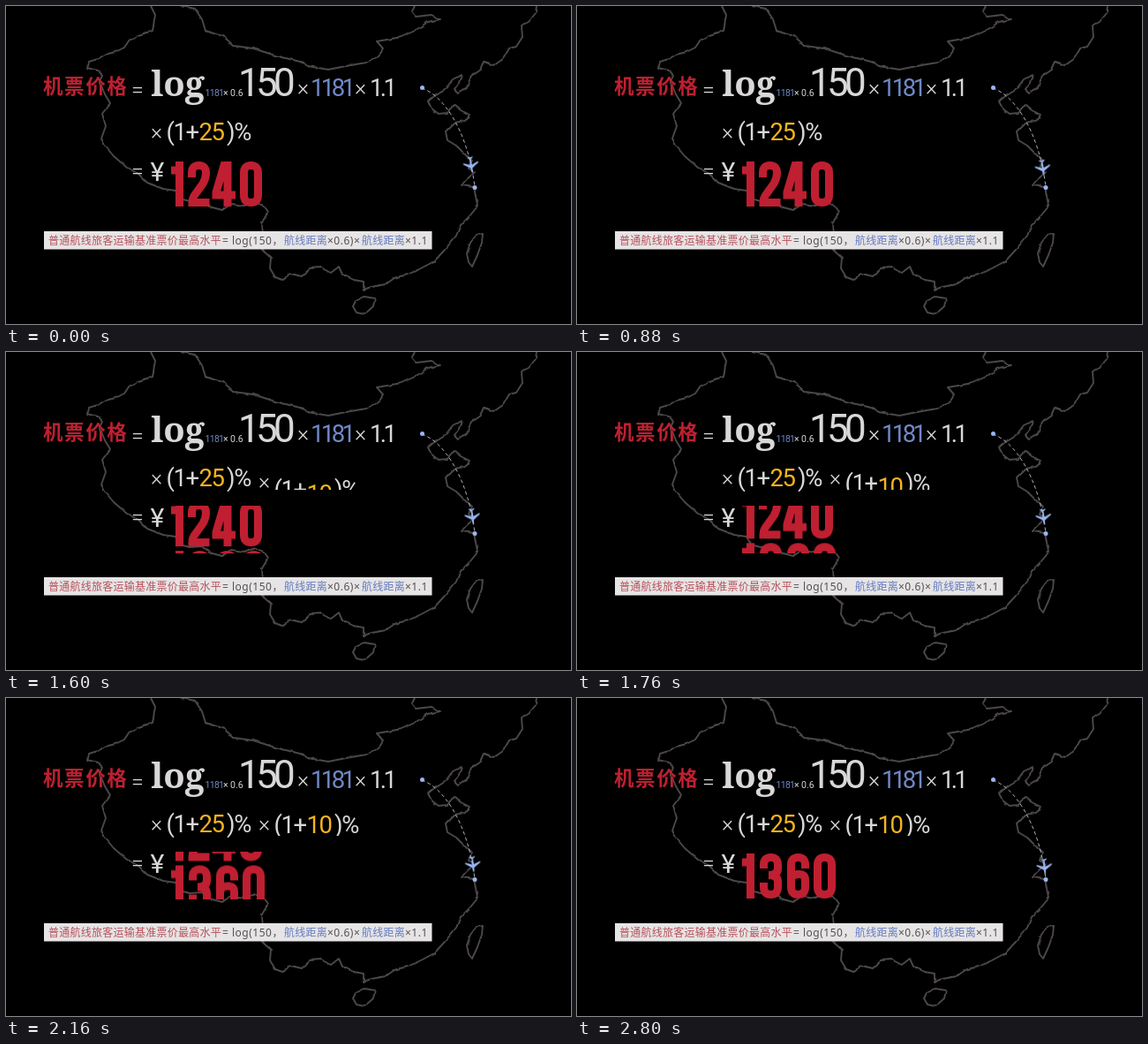
These frames come from a looping animation (640 px wide and 360 px high, 2.88 s). An HTML page:

```html
<!DOCTYPE html>
<html lang="zh-CN">
<head>
<meta charset="utf-8">
<title>机票价格</title>
<style>
  html, body { margin: 0; width: 100%; height: 100%; overflow: hidden; background: #000; }
  svg { display: block; width: 100vw; height: 100vh; }
  text { fill: #d9d7d7; font-family: Roboto, "Liberation Sans", sans-serif; white-space: pre; }
  .red { fill: #bd2031; }
  .blue { fill: #7088c6; }
  .gold { fill: #f4b41e; }
  .title { font: 700 22.5px "Noto Sans CJK SC", "Noto Sans CJK", sans-serif; letter-spacing: 1.6px; }
  .log { font: 600 40px "Noto Serif", serif; }
  .sub { font-size: 10.5px; letter-spacing: -.7px; }
  .base { font-size: 44px; letter-spacing: -4.7px; }
  .num { font-size: 27.5px; letter-spacing: -3.6px; }
  .term { font-size: 27.5px; letter-spacing: -1.4px; }
  .yen { font-size: 30px; }
  .sign { font-size: 25px; font-weight: 300; }
  .note { font: 12px "Noto Sans", "Noto Sans CJK SC", "Noto Sans CJK", sans-serif; letter-spacing: .5px; fill: #555051; }
  .note .red { fill: #b9505c; letter-spacing: .25px; }
  .note .blue { fill: #647bc2; letter-spacing: .25px; }
  .map { fill: none; stroke: #4d4848; stroke-width: 1.9; stroke-linejoin: round; }
  .digits { fill: none; stroke: #bf1f31; stroke-width: 9; }

  .roll, .slide, .plane { animation: 2880ms linear infinite; }
  .roll { animation-name: roll; }
  .plane { animation-name: fly; }
  .times { animation-name: times; }
  .paren { animation-name: paren; }
  .ten { animation-name: ten; }

  @keyframes roll {
    0%, 45.4% { transform: translateY(0); animation-timing-function: cubic-bezier(.37, 0, .63, 1); }
    89.5%, 100% { transform: translateY(-56px); }
  }
  @keyframes times {
    0%, 45.1% { transform: translateY(24px); animation-timing-function: cubic-bezier(.5, 1, .89, 1); }
    62.5%, 100% { transform: translateY(0); }
  }
  @keyframes paren {
    0%, 48.3% { transform: translateY(28px); animation-timing-function: cubic-bezier(.5, 1, .89, 1); }
    70.8%, 100% { transform: translateY(0); }
  }
  @keyframes ten {
    0%, 50% { transform: translateY(28px); animation-timing-function: cubic-bezier(.5, 1, .89, 1); }
    75%, 100% { transform: translateY(0); }
  }
  @keyframes fly {
    from { transform: translate(526.8px, 180px) rotate(-9deg); }
    to { transform: translate(529.6px, 191.5px) rotate(-6deg); }
  }
</style>
</head>
<body>
<svg viewBox="0 0 640 360">
  <defs>
    <filter id="rough" filterUnits="userSpaceOnUse" x="0" y="0" width="640" height="360" color-interpolation-filters="sRGB">
      <feTurbulence type="fractalNoise" baseFrequency=".1" numOctaves="2" seed="4" result="n"/>
      <feDisplacementMap in="SourceGraphic" in2="n" scale="3" xChannelSelector="R" yChannelSelector="G"/>
    </filter>
    <clipPath id="rowClip"><rect x="280" y="120" width="140" height="36"/></clipPath>
    <clipPath id="rollClip"><rect x="180" y="174" width="130" height="54"/></clipPath>
    <path id="d0" d="M4.5 13Q4.5 4.5 12.5 4.5T20.5 13V38Q20.5 46.5 12.5 46.5T4.5 38Z"/>
    <path id="d1" d="M10.5 51V0M1 10H10"/>
    <path id="d2" d="M4.5 18V13Q4.5 4.5 12.5 4.5T20.5 13Q20.5 19 17 25L7 39Q5 42 5 46.5H24.5"/>
    <path id="d3" d="M4.5 17V13Q4.5 4.5 12.5 4.5T20.5 13V17Q20.5 24.5 10 24.5Q20.5 24.5 20.5 32V38Q20.5 46.5 12.5 46.5T4.5 38V33"/>
    <path id="d4" d="M18 51V0M15 1L5 35V38H27"/>
    <path id="d6" d="M20.5 17V13Q20.5 4.5 12.5 4.5T4.5 13V38Q4.5 46.5 12.5 46.5T20.5 38V30Q20.5 23.5 13.5 23.5Q8 23.5 5 27"/>
  </defs>

  <g class="map" filter="url(#rough)">
    <path d="M164 0L169 10 166 28 150 33 140 38 134 47 124 52 112 55 104 60 94 63 92 70 103 73 109 79 106 85 112 100 118 110 109 122 113 136 108 150 112 158 122 170 137 183 150 190 160 200 178 207 192 209 197 218 208 221 222 220 230 227 245 231 255 224 270 226 283 222 292 226 297 233 290 245 291 260 290 276 300 285 299 297 305 307 313 310 322 303 335 306 345 297 356 296 368 302 377 295 381 304 394 310 405 312 405 321 414 318"/>
    <path d="M198 0L214 3 222 15 226 28 247 35 258 45 280 48 305 56 333 63 342 68 365 72 385 68 408 64 420 58 427 48 420 40 432 38 448 35 463 28 478 18 492 15 482 10 465 12 460 6 463 0"/>
    <path d="M601 0L600 8 592 18 584 22 585 35 578 46 570 48 563 60 553 67 541 63 537 72 527 79 522 92 512 99 508 95 513 88 516 78 506 83 497 95 484 103 478 108 482 116 490 122 500 121 508 112 515 118 525 123 520 130 508 132 498 142 500 152 510 158 520 168 527 175 524 184 531 188 520 198 516 203 530 205 532 215 534 227 525 238 515 248 510 260 497 276 485 289 470 297 455 304 440 308 430 315 414 318"/>
    <path d="M533 259L540 258 539 268 534 282 528 295 524 290 522 280 526 268Z"/>
    <path d="M396 334L406 329 418 331 416 340 406 349 397 347 393 340Z"/>
  </g>

  <path d="M471 93C495 101 523 140 531 205" fill="none" stroke="#a9aebc" stroke-dasharray="4 3"/>
  <g fill="#9ab6f2">
    <circle cx="471.5" cy="92.5" r="2.5"/>
    <circle cx="531" cy="205.5" r="2.5"/>
    <path class="plane" d="M0 9Q1.1 7 1.1 3.6L8.5-1.6V-3.2L1.1-.2 .8-6.6 3.2-8.4V-9.4L0-8.6-3.2-9.4V-8.4L-.8-6.6-1.1-.2-8.5-3.2V-1.6L-1.1 3.6Q-1.1 7 0 9Z"/>
  </g>

  <text class="title red" x="42" y="99">机票价格</text>
  <text class="sign" x="142" y="103.7">=</text>
  <text class="log" x="164.2" y="101.5">log</text>
  <text class="sub" y="102"><tspan class="blue" x="225.5">1181</tspan><tspan x="246">×</tspan><tspan x="254" letter-spacing="0">0.6</tspan></text>
  <text class="base" x="263" y="102">150</text>
  <text class="sign" x="330" y="101.2">×</text>
  <text class="num blue" x="345" y="102">1181</text>
  <text class="sign" x="395" y="101.2">×</text>
  <text class="num" x="412" y="102">1.1</text>

  <text class="sign" x="164" y="151.2">×</text>
  <text class="term" x="181.5" y="151.5">(1+</text>
  <text class="term gold" x="218.5" y="152">25</text>
  <text class="term" x="250" y="151.5">)%</text>

  <g clip-path="url(#rowClip)">
    <text class="sign slide times" x="286" y="151.2">×</text>
    <text class="term slide paren" x="303.5" y="152.5">(1+</text>
    <text class="term gold slide ten" x="340.5" y="153">10</text>
    <text class="term slide paren" x="372" y="152.5">)%</text>
  </g>

  <text class="sign" x="142" y="195.8">=</text>
  <text class="yen" x="163.5" y="198">¥</text>
  <g clip-path="url(#rollClip)">
    <g class="digits roll">
      <g role="img" aria-label="1240">
        <use href="#d1" x="186" y="176"/><use href="#d2" x="206" y="176"/><use href="#d4" x="233" y="176"/><use href="#d0" x="265" y="176"/>
      </g>
      <g role="img" aria-label="1360">
        <use href="#d1" x="186" y="232"/><use href="#d3" x="207" y="232"/><use href="#d6" x="238" y="232"/><use href="#d0" x="268" y="232"/>
      </g>
    </g>
  </g>

  <rect x="43" y="255" width="439.5" height="20.5" fill="#e6e4e4"/>
  <text class="note" y="270"><tspan class="red" x="48">普通航线旅客运输基准票价最高水平</tspan><tspan x="245">=</tspan><tspan x="256">log(150，</tspan><tspan class="blue" x="315">航线距离</tspan><tspan x="364">×0.6)×</tspan><tspan class="blue" x="403">航线距离</tspan><tspan x="452">×1.1</tspan></text>
</svg>
</body>
</html>
```
